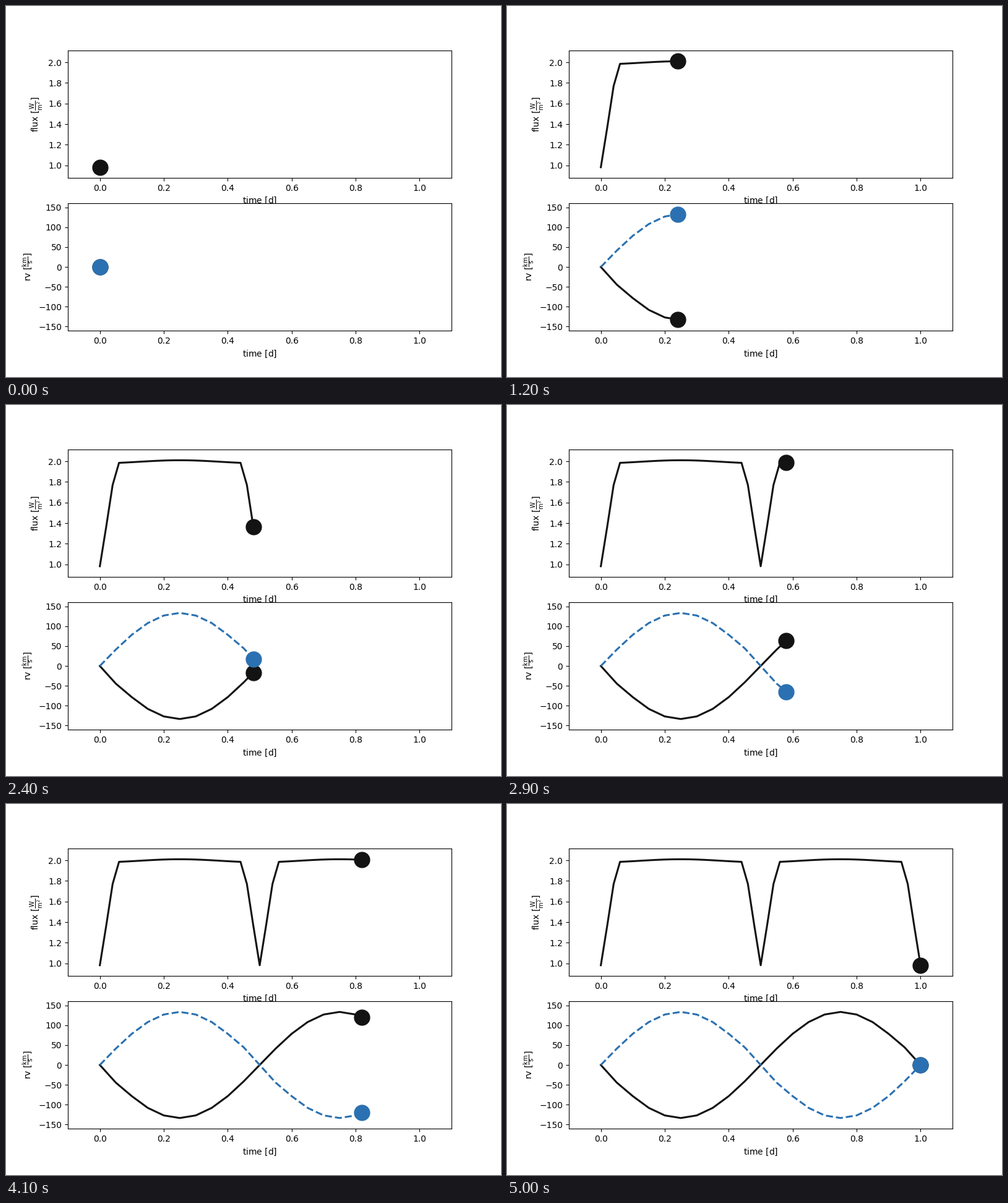
Write a matplotlib script that moves like this. It is 800x600 px and loops after 5100 ms.

```python
import matplotlib.pyplot as plt
import numpy as np
from matplotlib.animation import FuncAnimation

BLACK, BLUE = "#131313", "#2b71b1"
STEPS = 51
K = 133.6          # radial velocity amplitude
K_ECLIPSED = 44.5  # velocity of the partly hidden star near eclipse


def flux_curve(t):
    """Ellipsoidal variation with two equal eclipses per orbit."""
    flux = 1.9955 - 0.0145 * np.cos(4 * np.pi * t)
    phase = np.abs((t + 0.25) % 0.5 - 0.25)
    dip = np.interp(phase, [0, 0.02, 0.04], [0.9815, 1.367, 1.770])
    return np.where(phase < 0.05, dip, flux)


def rv_curve(t, sign, eclipse):
    """Sine curve, distorted beside the eclipse of this star."""
    rv = sign * K * np.sin(2 * np.pi * t)
    phase = np.abs((t - eclipse + 0.5) % 1 - 0.5)
    return np.where(np.isclose(phase, 0.05), np.sign(rv) * K_ECLIPSED, rv)


class Track:
    """A growing line with a large dot at its head."""

    def __init__(self, ax, x, y, color, style="-"):
        self.x, self.y = x, y
        self.line, = ax.plot([], [], style, color=color, lw=2.2)
        self.dot, = ax.plot([], [], "o", color=color, ms=17.9)

    def move(self, now):
        past = self.x < now - 1e-9
        head = np.interp(now, self.x, self.y)
        self.line.set_data(np.append(self.x[past], now),
                           np.append(self.y[past], head))
        self.dot.set_data([now], [head])


fig, (top, bottom) = plt.subplots(2, 1, figsize=(8, 6), dpi=100)
fig.subplots_adjust(left=0.125, right=0.9, bottom=0.125, top=0.88, hspace=0.2)

for ax, ylim, label in [
    (top, (0.8786, 2.1140), r"flux [$\mathrm{\frac{W}{m^{2}}}$]"),
    (bottom, (-1.2 * K, 1.2 * K), r"rv [$\mathrm{\frac{km}{s}}$]"),
]:
    ax.set(xlim=(-0.1, 1.1), ylim=ylim, ylabel=label)
    ax.set_xlabel(r"time [$\mathrm{d}$]")

times = np.linspace(0, 1, STEPS)
rv_times = np.linspace(0, 1, 21)
tracks = [
    Track(top, times, flux_curve(times), BLACK),
    Track(bottom, rv_times, rv_curve(rv_times, -1, 0), BLACK),
    Track(bottom, rv_times, rv_curve(rv_times, 1, 0.5), BLUE, "--"),
]


def update(i):
    for track in tracks:
        track.move(times[i])
    return [artist for t in tracks for artist in (t.line, t.dot)]


anim = FuncAnimation(fig, update, frames=STEPS, interval=100,
                     repeat=True, repeat_delay=0)
plt.show()
```
